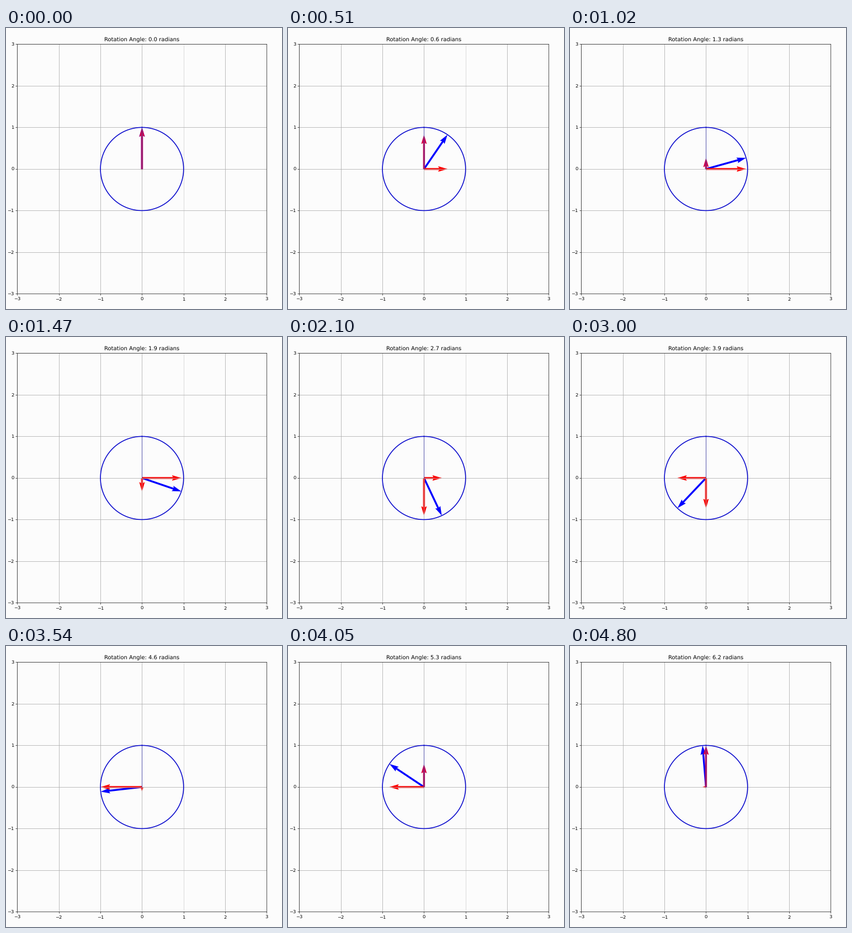
A matplotlib script that plays this animation: 500x510 px, repeating every 4.83 s.

```python
import numpy as np
import matplotlib.pyplot as plt
from matplotlib.animation import FuncAnimation

W, H, DPI = 500, 510, 60
FRAMES, INTERVAL = 161, 30
FRAMES_PER_STEP = 2.543   # the angle is held for two or three frames
STEP = 0.1                # radians
PAPER = "#fcfcfc"
LEFT, TOP, RIGHT, BOTTOM = 20.4, 29.4, 472.4, 482.4

plt.rcParams["font.family"] = "DejaVu Sans"
plt.rcParams["text.hinting"] = "none"

fig = plt.figure(figsize=(W / DPI, H / DPI), dpi=DPI, facecolor=PAPER)
ax = fig.add_axes(
    [LEFT / W, 1 - BOTTOM / H, (RIGHT - LEFT) / W, (BOTTOM - TOP) / H],
    facecolor=PAPER,
)
ax.set(xlim=(-3, 3), ylim=(-3, 3), xticks=range(-3, 4), yticks=range(-3, 4))
ax.tick_params(labelsize=10)
ax.tick_params(axis="x", pad=4.2)
ax.grid(True, color="#b0b0b0", linewidth=1.0)
ax.xaxis.get_gridlines()[4].set_color("#d4d4d4")
for spine in ax.spines.values():
    spine.set(linewidth=1.0, edgecolor="#303030")
title = ax.set_title("", fontsize=12)

# Unit circle and the fixed reference radius
turn = np.linspace(0, 2 * np.pi, 200)
ax.plot(np.sin(turn), np.cos(turn), color="#0808cc", linewidth=1.9)
ax.plot([0, 0], [0, 1], color="#0000a0", linewidth=1.2, alpha=0.55)

# Rotating vector with its horizontal and vertical components
origin = np.zeros(3)
arrows = ax.quiver(
    origin, origin, [0, 0, 0], [1, 0, 1],
    angles="xy", scale_units="xy", scale=1, zorder=1,
    color=["blue", "red", "red"],
)


def update(frame):
    angle = STEP * int(frame / FRAMES_PER_STEP)
    x, y = np.sin(angle), np.cos(angle)
    arrows.set_UVC([x, x, 0], [y, 0, y])
    # The upward component blends with the blue radius
    arrows.set_facecolor(["blue", "red", "#d0004c" if y > 0 else "red"])
    title.set_text(f"Rotation Angle: {angle:.1f} radians")
    return arrows, title


anim = FuncAnimation(fig, update, frames=FRAMES, interval=INTERVAL, repeat=True)
plt.show()
```
